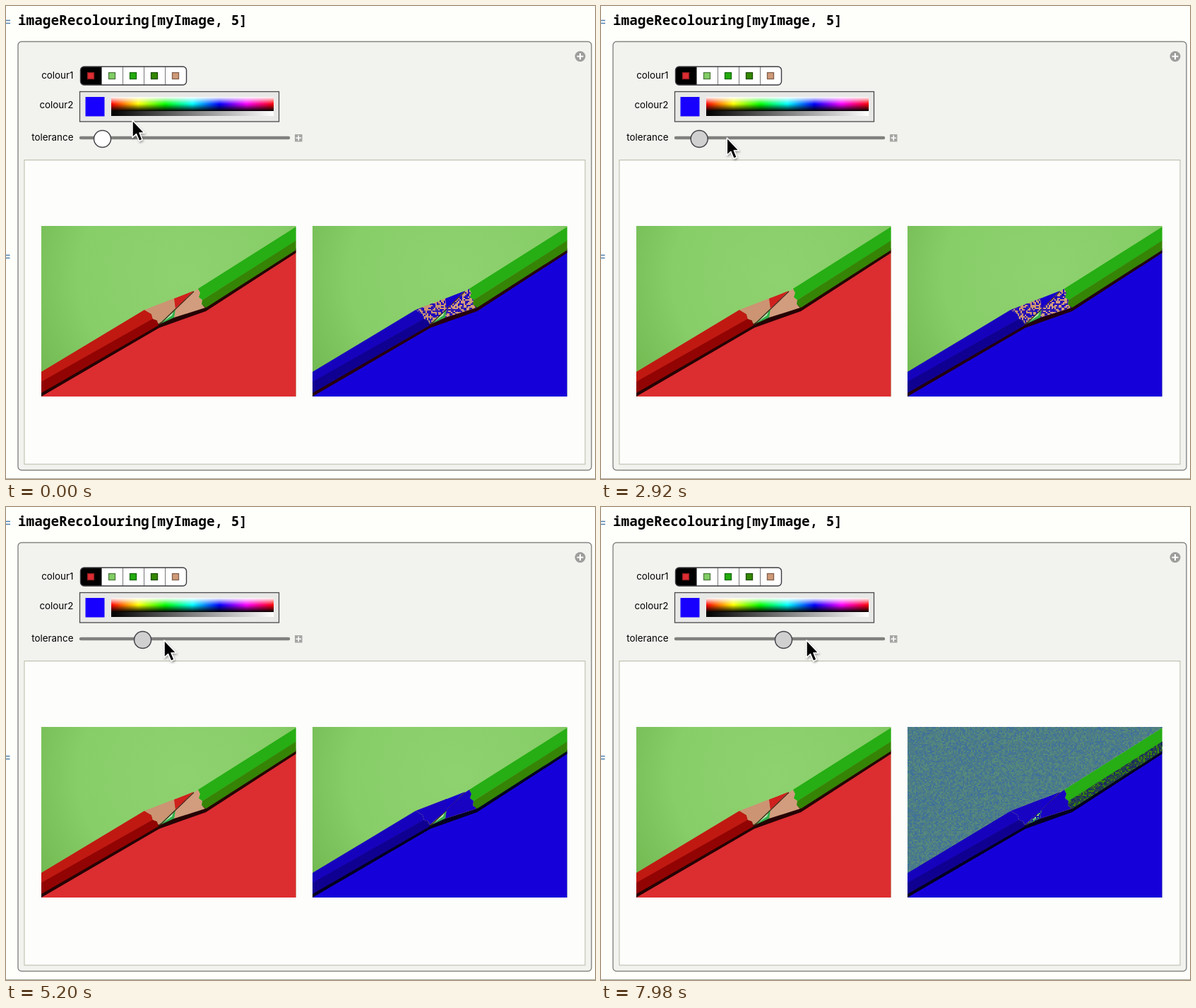
Write an HTML page with a canvas that moves like this. It is 834 by 671 pixels and loops after 8000 ms.

```html
<!DOCTYPE html>
<html lang="en">
<head>
<meta charset="utf-8">
<title>Image recolouring</title>
<style>
  html, body { margin: 0; width: 100%; height: 100%; overflow: hidden; background: #fefefb; }
  svg, canvas { position: absolute; left: 0; top: 0; display: block; }
  canvas { left: 434px; top: 312px; }
  .code { font: 600 19.35px "Noto Sans Mono", monospace; }
  .label { font: 400 13.4px Inter, sans-serif; text-anchor: end; }
</style>
</head>
<body>
<svg id="stage" width="834" height="671" viewBox="0 0 834 671">
  <defs>
    <linearGradient id="hue"></linearGradient>
    <linearGradient id="shade" x2="0" y2="1">
      <stop offset="0" stop-color="#fff"/>
      <stop offset=".5" stop-color="#fff" stop-opacity="0"/>
      <stop offset=".5" stop-color="#000" stop-opacity="0"/>
      <stop offset="1" stop-color="#000"/>
    </linearGradient>
    <linearGradient id="grey"><stop stop-color="#000"/><stop offset="1" stop-color="#fff"/></linearGradient>
    <radialGradient id="paper" gradientUnits="userSpaceOnUse" cx="200" cy="70" r="270">
      <stop offset="0" stop-color="#8ed26f"/>
      <stop offset=".55" stop-color="#87cd68"/>
      <stop offset="1" stop-color="#6cb44c"/>
    </radialGradient>
    <clipPath id="crop"><rect width="360.5" height="242"/></clipPath>
    <filter id="soft" x="-50%" y="-50%" width="200%" height="200%">
      <feDropShadow dx="1" dy="2" stdDeviation="1.5" flood-opacity=".35"/>
    </filter>
  </defs>

  <path d="M0 20.5H6M0 24.5H6M0 353.500H5.500M0 357.500H5.500" stroke="#4c7fae" stroke-width="1.4"/>
  <text class="code" x="17" y="27">imageRecolouring[myImage, 5]</text>
  <path d="M0 670.500H834" stroke="#a5a595"/>
  <rect x="17" y="50.500" width="812" height="608" rx="5" fill="#f2f2ef" stroke="#858583" stroke-width="1.4"/>
  <circle cx="813" cy="71.500" r="7.500" fill="#9d9d9b"/>
  <path d="M808.500 71.500H817.500M813 67V76" stroke="#fff" stroke-width="2"/>

  <text class="label" x="95.500" y="103">colour1</text>
  <text class="label" x="95.500" y="145">colour2</text>
  <text class="label" x="95.500" y="191">tolerance</text>

  <g id="setter">
    <rect x="105.500" y="86" width="150" height="26" rx="5" fill="#fff"/>
    <path d="M135.500 86H110.500a5 5 0 0 0 -5 5v16a5 5 0 0 0 5 5h25z"/>
    <path d="M165.500 86V112M195.500 86V112M225.500 86V112" stroke="#77777c"/>
    <rect x="105.500" y="86" width="150" height="26" rx="5" fill="none" stroke="#3c3c42" stroke-width="1.4"/>
  </g>

  <rect x="104.500" y="121.500" width="282" height="42.500" fill="#e8e8e7" stroke="#4a4a4a" stroke-width="1.3"/>
  <rect x="112.500" y="129" width="27" height="27.500" fill="#1800ff"/>
  <rect x="149" y="129" width="230" height="20" fill="url(#hue)"/>
  <rect x="149" y="129" width="230" height="20" fill="url(#shade)"/>
  <rect x="149" y="149" width="230" height="7" fill="url(#grey)"/>

  <path d="M106 187H400" stroke="#80807e" stroke-width="4.500" stroke-linecap="round"/>
  <rect x="409" y="182" width="10.500" height="10.500" fill="#a5a5a3"/>
  <path d="M410.500 187.250H418M414.250 183.500V191" stroke="#fff" stroke-width="1.600"/>
  <circle id="knob" cy="188.500" r="12" stroke="#45454a" stroke-width="1.500"/>

  <rect x="26" y="218.500" width="794" height="431.500" fill="#fdfdfc" stroke="#b9b9a6"/>
  <g id="photos"></g>
  <path id="cursor" filter="url(#soft)" d="M0 0V24.500L5.500 19.500L9.700 29.500L14 27.500L10 18H17Z"
        fill="#000" stroke="#fff" stroke-width="1.500" stroke-linejoin="round"/>
</svg>
<canvas id="specks" width="361" height="242"></canvas>

<script>
const NS = 'http://www.w3.org/2000/svg';
const byId = id => document.getElementById(id);

function add(parent, tag, attrs) {
  const node = document.createElementNS(NS, tag);
  for (const key in attrs) node.setAttribute(key, attrs[key]);
  return parent.appendChild(node);
}

['#f00', '#ff0', '#0f0', '#0ff', '#00f', '#f0f', '#f00'].forEach((color, i) =>
  add(byId('hue'), 'stop', { offset: i / 6, 'stop-color': color }));

[['#dd2e33', '#8f1c20'], ['#82cd66', '#4d7c3c'], ['#23ab0d', '#156a08'],
 ['#348800', '#1d4d00'], ['#cf9a79', '#805f4a']].forEach(([fill, stroke], i) =>
  add(byId('setter'), 'rect', { x: 115.5 + 30 * i, y: 94.5, width: 9, height: 9, fill, stroke, 'stroke-width': 1.3 }));

// Shapes of the still life, in a 360 x 242 box.
const shape = {
  backdrop: 'M0 0H361V1L222 89L216 92L190 102L146 119L0 207Z',
  table: 'M0 241L166 141L232 118L361 35V242H0Z',
  shadow: 'M0 235L166 138L230 112L361 32V38L233 121L167 144.500L0 242Z',
  bodyTop: 'M0 207L146 119L156 125L158 132L0 222Z',
  bodyLow: 'M0 221L158 131.500L164 134L166 141L0 237Z',
  woodLeft: 'M146 119L190 102L190 118L166 139L164 134L158 132L156 125Z',
  leadTop: 'M188 103L216 92L190 118Z',
  woodRight: 'M222 89L225 95L223 101L228 105L227 111L232 116L188 130L190 117L216 93Z',
  leadLow: 'M166 140L190 117L188 130Z',
  glint: 'M169 138L187 122L185 127Z',
  stemTop: 'M222 89L361 1V21L228 105L223 101L225 95Z',
  stemLow: 'M228 105L361 20.500V34L233 116L227 111Z'
};

function photo(x, red) {
  const g = add(byId('photos'), 'g', { transform: `translate(${x} 312)`, 'clip-path': 'url(#crop)' });
  add(g, 'rect', { width: 361, height: 242, fill: 'url(#paper)' });
  const fills = {
    table: red.table, shadow: red.shadow, bodyTop: red.top, bodyLow: red.low,
    woodLeft: '#cc9473', leadTop: red.lead, woodRight: '#d29d7e', leadLow: '#32ae4a',
    glint: '#b9e8b4', stemTop: '#26ae14', stemLow: '#358406'
  };
  const parts = {};
  for (const key in fills) parts[key] = add(g, 'path', { d: shape[key], fill: fills[key] });
  add(g, 'path', { d: 'M216 93L167 140', stroke: '#45251c', 'stroke-width': 1.2 });
  return parts;
}

photo(50, { table: '#dc2d31', shadow: '#260304', top: '#c01912', low: '#920403', lead: '#cf211d' });
const recoloured = photo(434, { table: '#1600da', shadow: '#260010', top: '#1602bd', low: '#100092', lead: '#1500cc' });

// Seeded noise gives each speck its own threshold.
let seed = 7;
const random = () => (seed = (seed * 16807) % 2147483647) / 2147483647;
const noise = Array.from({ length: 181 * 121 }, random);
const ctx = byId('specks').getContext('2d');

function speckle(names, level, colors) {
  if (level <= 0) return;
  const region = new Path2D();
  names.forEach(name => region.addPath(new Path2D(shape[name])));
  ctx.save();
  ctx.clip(region);
  noise.forEach((n, i) => {
    if (n >= level) return;
    ctx.fillStyle = colors[Math.floor(n * 997) % colors.length];
    ctx.fillRect(i % 181 * 2, Math.floor(i / 181) * 2, 2, 2);
  });
  ctx.restore();
}

// Piecewise linear lookup in rows of [position, value].
function lookup(rows, p) {
  const next = rows.findIndex(row => row[0] > p);
  if (next === 0) return rows[0][1];
  if (next < 0) return rows[rows.length - 1][1];
  const [p0, v0] = rows[next - 1], [p1, v1] = rows[next];
  return v0 + (v1 - v0) * (p - p0) / (p1 - p0);
}

const cursorX = [[0, 179], [250, 174], [700, 150], [950, 144], [1600, 144], [2120, 157],
  [3660, 198], [5200, 224], [6460, 252], [7980, 291]];
const cursorY = [[0, 162], [250, 166], [700, 182], [950, 186], [2120, 187], [3660, 187],
  [5200, 189], [6460, 188], [7980, 189]];
const knobX = [[2800, 136], [3660, 155], [5200, 193], [6460, 222], [7980, 258]];
const woodLevel = [[136, .45], [155, .86], [185, 1]];
const paperLevel = [[234, 0], [257, 1]];
const pressTime = 1500;
let drawn = -1;

function recolour(knob) {
  if (knob === drawn) return;
  drawn = knob;
  const wood = lookup(woodLevel, knob), paper = lookup(paperLevel, knob);
  const tint = (wood - .45) / .55;
  recoloured.shadow.setAttribute('fill', `rgb(${38 - 34 * tint} 0 ${16 + 18 * tint})`);
  ctx.clearRect(0, 0, 361, 242);
  speckle(['woodLeft', 'woodRight'], wood, wood < 1 ? ['#2c12b4', '#3b25a8', '#1a06c0'] : ['#1803c2']);
  speckle(['backdrop'], paper, ['#4c7f86', '#40719a', '#568a7c', '#48788c', '#527f80']);
  speckle(['leadLow'], paper * .55, ['#1a10b0', '#2b5590']);
  speckle(['stemLow'], paper * .8, ['#22404c', '#1c2c60', '#2a5038']);
}

function frame() {
  const t = performance.now() % 8000;
  const knob = lookup(knobX, t);
  byId('knob').setAttribute('cx', knob + .5);
  byId('knob').setAttribute('fill', t < pressTime ? '#fff' : '#d0d0d0');
  byId('cursor').setAttribute('transform', `translate(${lookup(cursorX, t)} ${lookup(cursorY, t)})`);
  recolour(knob);
  requestAnimationFrame(frame);
}
frame();
</script>
</body>
</html>
```
